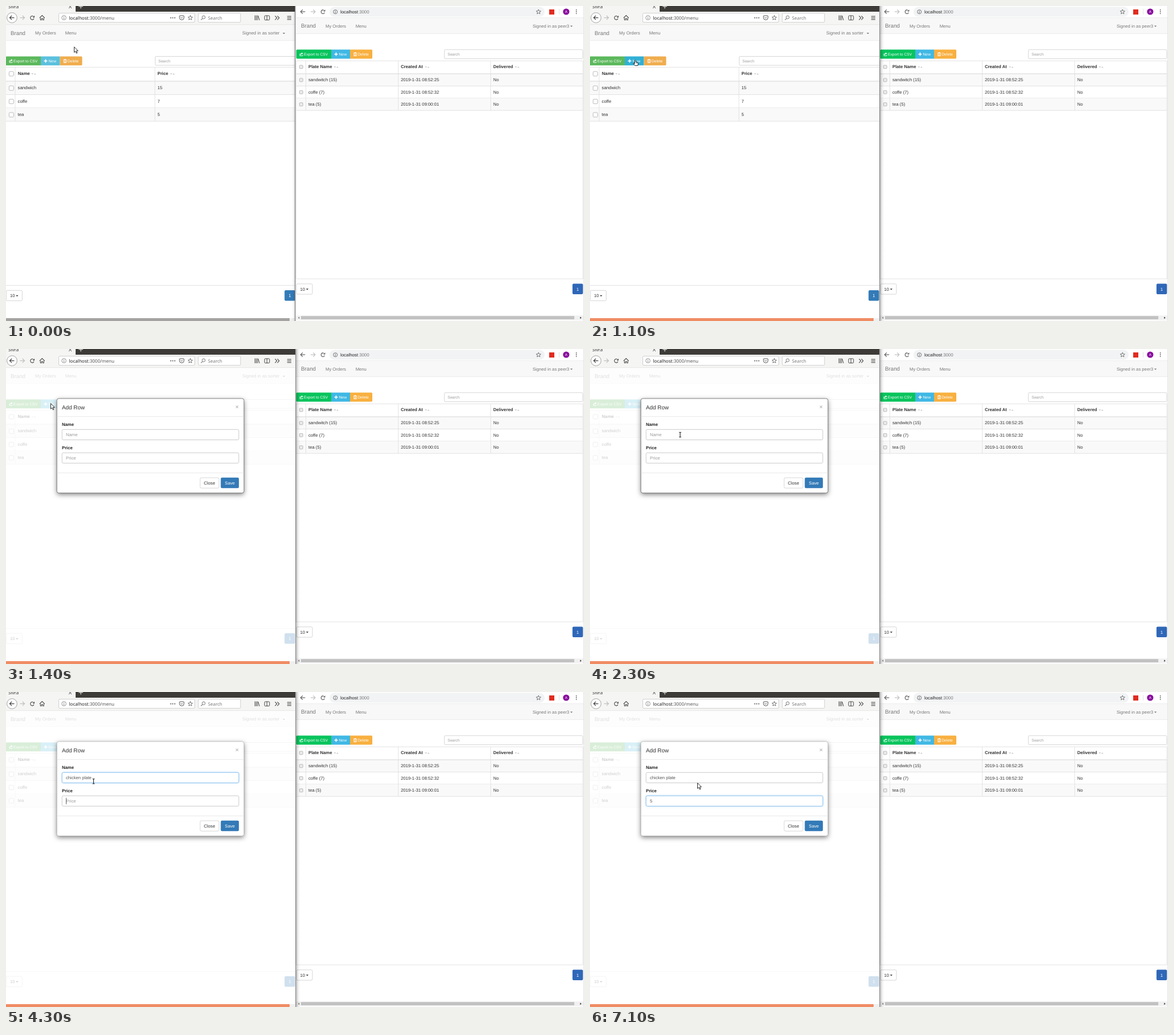
These frames come from a looping animation (1013x553 px, 8000 ms). An HTML page with a canvas:

```html
<!DOCTYPE html>
<html lang="en">
<head>
<meta charset="utf-8">
<title>Two order windows</title>
<style>
html, body { margin: 0; width: 100%; height: 100%; overflow: hidden; background: #fff; }
canvas { display: block; }
</style>
</head>
<body>
<canvas id="stage" width="1013" height="553"></canvas>
<script>
const g = document.getElementById('stage').getContext('2d');
const SANS = '"Liberation Sans", Arial, sans-serif';
const UI = '"Noto Sans", "Open Sans", sans-serif';
const LOOP = 8000;

// --- helpers ---
function rect(x, y, w, h, fill) {
  g.fillStyle = fill;
  g.fillRect(x, y, w, h);
}
function box(x, y, w, h, r, fill, line, lw = 0.8) {
  g.beginPath();
  g.roundRect(x, y, w, h, r);
  if (fill) { g.fillStyle = fill; g.fill(); }
  if (line) { g.strokeStyle = line; g.lineWidth = lw; g.stroke(); }
}
// y is the middle of the capitals; returns the right end
function text(s, x, y, size, color, weight = '', family = SANS) {
  g.font = `${weight} ${size}px ${family}`;
  g.fillStyle = color;
  g.fillText(s, x, y + size * 0.36);
  return x + g.measureText(s).width;
}
function path(points, color, lw = 1, fill, close) {
  g.beginPath();
  points.forEach(([x, y], i) => i ? g.lineTo(x, y) : g.moveTo(x, y));
  if (close) g.closePath();
  if (fill) { g.fillStyle = fill; g.fill(); }
  if (color) { g.strokeStyle = color; g.lineWidth = lw; g.stroke(); }
}
function ring(x, y, r, color, lw = 0.8, fill) {
  g.beginPath();
  g.arc(x, y, r, 0, Math.PI * 2);
  if (fill) { g.fillStyle = fill; g.fill(); }
  if (color) { g.strokeStyle = color; g.lineWidth = lw; g.stroke(); }
}
function at(x, y, draw) {
  g.save();
  g.translate(x, y);
  draw();
  g.restore();
}

// --- toolbar icons ---
function arrowIcon(x, y, dir, color) {
  at(x, y, () => {
    g.scale(dir, 1);
    path([[-3.8, 0], [4, 0]], color, 1.1);
    path([[-0.4, -3.6], [-4, 0], [-0.4, 3.6]], color, 1.1);
  });
}
function reloadIcon(x, y, color) {
  g.beginPath();
  g.arc(x, y, 3.2, 0.4, 5.3);
  g.strokeStyle = color;
  g.lineWidth = 1.1;
  g.stroke();
  path([[x + 4, y - 4], [x + 4, y - 0.6], [x + 0.7, y - 0.6]], null, 0, color, true);
}
function infoIcon(x, y, r, color) {
  ring(x, y, r, color, 0.8);
  rect(x - 0.45, y - 0.6, 0.9, 2.8, color);
  rect(x - 0.45, y - 2.2, 0.9, 0.9, color);
}
function starIcon(x, y, color) {
  const p = [];
  for (let i = 0; i < 10; i++) {
    const a = i * Math.PI / 5 - Math.PI / 2, r = i % 2 ? 1.9 : 4.3;
    p.push([x + r * Math.cos(a), y + r * Math.sin(a)]);
  }
  path(p, color, 0.8, null, true);
}
function homeIcon(x, y) {
  path([[x - 4.5, y + 0.3], [x, y - 4], [x + 4.5, y + 0.3]], '#444', 1.1);
  path([[x - 3, y], [x - 3, y + 4], [x - 1, y + 4], [x - 1, y + 1.2], [x + 1, y + 1.2],
    [x + 1, y + 4], [x + 3, y + 4], [x + 3, y]], '#444', 1);
}

// --- page parts ---
function caret(x, y, color, w = 2.2) {
  path([[x - w, y - w / 2], [x + w, y - w / 2], [x, y + w / 2]], null, 0, color, true);
}
function sorter(x, y) {
  caret(x, y, '#c4c4c4', 2);
  path([[x + 2.4, y + 1], [x + 6.4, y + 1], [x + 4.4, y - 1]], null, 0, '#c4c4c4', true);
}
function actionBar(x, y, widths, colors) {
  let left = x;
  widths.forEach((w, i) => {
    const radii = i === 0 ? [1.6, 0, 0, 1.6] : i === 2 ? [0, 1.6, 1.6, 0] : 0;
    box(left, y, w, 15.8, radii, colors[i]);
    left += w;
  });
  const m = y + 8;
  const ex = x + 6;
  path([[ex + 1.6, m - 0.6], [ex + 0.4, m - 0.6], [ex + 0.4, m + 2.7], [ex + 5.4, m + 2.7], [ex + 5.4, m + 1.2]], '#fff', 0.9);
  path([[ex + 1.7, m + 1.2], [ex + 2.4, m - 0.8], [ex + 3.8, m - 1.4]], '#fff', 1);
  path([[ex + 3.2, m - 3.2], [ex + 6.2, m - 1.4], [ex + 3.2, m + 0.4]], null, 0, '#fff', true);
  text('Export to CSV', ex + 7.4, m, 6.65, '#fff');
  const nx = x + widths[0] + 5.5;
  rect(nx, m - 0.8, 6, 1.6, '#fff');
  rect(nx + 2.2, m - 3, 1.6, 6, '#fff');
  text('New', nx + 8, m, 6.75, '#fff');
  const tx = x + widths[0] + widths[1] + 6;
  rect(tx, m - 2.6, 6, 1, '#fff');
  rect(tx + 2, m - 3.5, 2, 1, '#fff');
  path([[tx + 0.8, m - 1.2], [tx + 0.8, m + 3], [tx + 5.2, m + 3], [tx + 5.2, m - 1.2]], '#fff', 0.9);
  path([[tx + 2.3, m - 1], [tx + 2.3, m + 2.6]], '#fff', 0.6);
  path([[tx + 3.7, m - 1], [tx + 3.7, m + 2.6]], '#fff', 0.6);
  text('Delete', tx + 7.2, m, 6.8, '#fff');
}
function navbar(x, y, size, user, userX, caretX) {
  text('Brand', x, y - 0.4, 9.75, '#777');
  text('My Orders', x + 43, y, size, '#777');
  text('Menu', x + 95.7, y, size, '#777');
  text(user, userX, y, size, '#777');
  caret(caretX, y + 0.6, '#777');
}
function pager(x, y, pageX, blue) {
  box(x, y, 28, 18.2, 2, '#fff', '#ccc');
  text('10', x + 6.5, y + 9.2, 7.7, '#333');
  caret(x + 19, y + 9.5, '#333');
  box(pageX, y - 0.2, 18.4, 18.4, 2, blue);
  text('1', pageX + 7, y + 9.2, 7.7, '#fff');
}
function hline(x1, x2, y, color = '#ddd', h = 0.8) { rect(x1, y - h / 2, x2 - x1, h, color); }
function vline(x, y1, y2, color = '#ddd') { rect(x - 0.4, y1, 0.8, y2 - y1, color); }

function leftPage(hover) {
  rect(0, 33, 507, 520, '#fff');
  rect(0, 33, 507, 27.5, '#f8f8f8');
  hline(0, 507, 60.5, '#e9e9e9');
  navbar(8, 47.5, 7.85, 'Signed in as sorter', 414, 487);
  actionBar(-0.4, 88.5, [61.4, 33.5, 39], ['#5cb85c', hover ? '#31b0d5' : '#5bc0de', '#f0ad4e']);
  box(261.5, 88.5, 250, 15.6, 1.6, '#fff', '#ccc');
  text('Search', 267, 96.7, 6.6, '#999');

  const top = 132, step = 23.4;
  [['sandwich', '15'], ['coffe', '7'], ['tea', '5']].forEach(([name, price], i) => {
    const y = top + i * step;
    if (i % 2 === 0) rect(0, y, 507, step, '#f9f9f9');
    hline(0, 507, y + step);
    box(5.4, y + 8.2, 8, 8, 1.6, '#fff', '#aaa');
    text(name, 20.5, y + 11.5, 7.8, '#333');
    text(price, 265.5, y + 11.5, 7.7, '#333');
  });
  hline(0, 507, 107.6);
  hline(0, 507, top, '#ddd', 1.2);
  vline(16, 107.6, 202);
  vline(261, 107.6, 202);
  box(5.4, 115, 8, 8, 1.6, '#fff', '#aaa');
  text('Name', 20.8, 118.5, 7.7, '#333', 'bold');
  sorter(46.3, 119.3);
  text('Price', 265.5, 118.5, 7.7, '#333', 'bold');
  sorter(289.5, 119.3);
  hline(0, 507, 490.4);
  pager(0.4, 499.3, 488.2, '#337ab7');
}

function leftChrome(active) {
  rect(0, 0, 507, 10, '#3d3b37');
  rect(0, 0, 122, 10, '#f5f5f4');
  rect(0, 10, 507, 23, '#f5f5f4');
  text('Sivra', 4, 1.6, 8, '#333', '', UI);
  path([[110, -1], [115, 4]], '#444', 1);
  path([[115, -1], [110, 4]], '#444', 1);
  rect(127.3, 0.2, 7.6, 1.2, '#ddd');
  rect(130.5, 0, 1.2, 4.5, '#ddd');

  ring(10.5, 20.6, 8.9, '#999', 0.9, '#fdfdfd');
  arrowIcon(10.5, 20.6, 1, '#333');
  arrowIcon(28.5, 20.6, -1, '#bbb');
  reloadIcon(46, 20.8, '#444');
  homeIcon(63.3, 20.6);
  box(92.5, 12.6, 238.3, 16, 1.6, '#fff', '#c4c4c4');
  infoIcon(101.6, 20.6, 3.8, '#777');
  const end = text('localhost', 110.5, 20.7, 8.05, '#222', '', UI);
  text(':3000/menu', end, 20.7, 8.05, '#555', '', UI);
  [288.8, 292.3, 295.8].forEach(x => ring(x, 20.8, 1, null, 0, '#555'));
  box(304, 17, 8, 7.4, [1, 1, 4, 4], null, '#555', 1);
  path([[306, 19.6], [308, 21.6], [310, 19.6]], '#555', 1);
  starIcon(323, 20.8, '#555');
  box(337, 12.6, 74, 16, 1.6, '#fff', '#c4c4c4');
  ring(346.4, 19.8, 2.7, '#777', 1);
  path([[344.4, 21.8], [341.6, 24.6]], '#777', 1.1);
  text('Search', 354, 20.7, 7.9, '#777', '', UI);
  [436.3, 438.6, 440.9].forEach(x => path([[x, 16.5], [x, 25]], '#444', 1));
  path([[441.8, 17], [444.3, 25]], '#444', 1);
  box(453.2, 17, 8.6, 7.6, 1.2, null, '#444', 1);
  path([[457.3, 17], [457.3, 24.6]], '#444', 1);
  [471.5, 475.5].forEach(x => path([[x, 17.3], [x + 3.3, 20.8], [x, 24.3]], '#444', 1.1));
  [17.6, 20.4, 23.2].forEach(y => rect(492.8, y, 7.2, 1.1, '#444'));
  hline(0, 507, 32.8, '#ddd', 0.6);

  rect(0, 548, 507, 5, '#f0efee');
  rect(0, 548, 497, 5, active ? '#f08c64' : '#a5a3a1');
}

function rightWindow() {
  rect(507, 0, 506, 553, '#fff');
  box(567, 1.6, 377, 17.2, 8.6, '#f1f3f4');
  arrowIcon(520.3, 10, 1, '#555');
  arrowIcon(538, 10, -1, '#bbb');
  reloadIcon(555.4, 10.2, '#555');
  infoIcon(577.2, 10.2, 3.5, '#555');
  const end = text('localhost', 586, 10.2, 7.85, '#222');
  text(':3000', end, 10.2, 7.85, '#777');
  starIcon(933.3, 10.3, '#555');
  rect(952, 6, 9, 9, '#e02c20');
  rect(969, 5, 0.8, 10, '#ddd');
  ring(981.8, 10, 5.6, null, 0, '#8a0f9e');
  text('A', 979.8, 10.2, 6, '#fff');
  [6.9, 10, 13.1].forEach(y => ring(999.6, y, 0.9, null, 0, '#555'));

  rect(508, 20.5, 504, 28, '#f8f8f8');
  hline(508, 1012, 20.5, '#e4e4e4', 0.6);
  hline(508, 1012, 48.6, '#e9e9e9');
  navbar(517, 35, 7.68, 'Signed in as peer3', 923, 991);
  actionBar(508.6, 76.6, [61.4, 33, 39], ['#08c45c', '#40b8e4', '#f8b040']);
  box(768.3, 76.7, 242.5, 15.8, 1.6, '#fff', '#ccc');
  text('Search', 774, 84.8, 6.6, '#999');

  const top = 119, step = 21.4;
  [['sandwitch (15)', '08:52:25'], ['coffe (7)', '08:52:32'], ['tea (5)', '09:00:01']].forEach(([name, time], i) => {
    const y = top + i * step;
    if (i % 2 === 0) rect(508.5, y, 502.5, step, '#f9f9f9');
    hline(508.5, 1011, y + step);
    box(514.4, y + 8, 5.8, 5.8, 1, '#ececec', '#aaa');
    text(name, 530, y + 10.6, 7.7, '#333');
    text('2019-1-31 ' + time, 692, y + 10.6, 7.68, '#333');
    text('No', 854, y + 10.6, 7.7, '#333');
  });
  hline(508.5, 1011, 96.2);
  hline(508.5, 1011, top, '#ddd', 1.2);
  [525.5, 687.5, 849.5].forEach(x => vline(x, 96, 183.2));
  [508.6, 1011].forEach(x => vline(x, 96, 479));
  hline(508.5, 1011, 479);
  box(514.4, 104, 5.8, 5.8, 1, '#ececec', '#aaa');
  [['Plate Name', 530, 576.5], ['Created At', 692, 736], ['Delivered', 854, 893.5]].forEach(([s, x, sx]) => {
    text(s, x, 106.2, 7.7, '#333', 'bold');
    sorter(sx, 107.2);
  });
  pager(509, 487.8, 992.8, '#2f67b8');

  rect(508, 543.4, 505, 7.6, '#f1f1f1');
  rect(517, 544.3, 479, 5.8, '#c1c1c1');
  path([[514.2, 545.4], [514.2, 549.2], [511.8, 547.3]], null, 0, '#777', true);
  path([[1006.2, 545.4], [1006.2, 549.2], [1008.6, 547.3]], null, 0, '#333', true);
  rect(508, 551, 505, 2, '#fafafa');
  rect(1012, 0, 1, 553, '#e4e4e4');
}

// the focused window casts its shadow over the other one
function edge(active) {
  const s = active ? g.createLinearGradient(507, 0, 516, 0) : g.createLinearGradient(507, 0, 502, 0);
  s.addColorStop(0, active ? 'rgba(0,0,0,.46)' : 'rgba(0,0,0,.16)');
  s.addColorStop(0.25, active ? 'rgba(0,0,0,.2)' : 'rgba(0,0,0,.1)');
  s.addColorStop(0.6, 'rgba(0,0,0,.05)');
  s.addColorStop(1, 'rgba(0,0,0,0)');
  rect(active ? 507 : 502, 0, active ? 9 : 5, 553, s);
  if (!active) rect(506.2, 0, 1.2, 553, '#777');
}

// --- dialog ---
function field(y, value, hint, focus, bar) {
  g.save();
  if (focus) { g.shadowColor = 'rgba(102,175,233,.4)'; g.shadowBlur = 4; }
  box(98.2, y, 309.8, 18.2, 2.2, '#fff');
  g.restore();
  box(98.2, y, 309.8, 18.2, 2.2, null, focus ? '#7dbaec' : '#c4c4c4', 0.9);
  text(value || hint, 105, y + 9.2, 7.7, value ? '#555' : '#999');
  if (bar) rect(bar, y + 3.5, 0.8, 11.5, '#444');
}
function dialog(t, alpha, dy) {
  g.save();
  g.globalAlpha = alpha;
  g.translate(0, dy);
  g.save();
  g.shadowColor = 'rgba(0,0,0,.5)';
  g.shadowBlur = 9;
  g.shadowOffsetY = 2.8;
  box(89.2, 87, 327.8, 165.8, 3.3, '#fff');
  g.restore();
  box(89.2, 87, 327.8, 165.8, 3.3, null, t < 3300 ? 'rgba(0,0,0,.5)' : 'rgba(0,0,0,.22)', 0.9);
  text('Add Row', 98, 102.7, 9.9, '#333');
  text('×', 402, 101.7, 10, '#bbb', 'bold');
  hline(89.6, 416.6, 118.5, '#e5e5e5');
  text('Name', 98, 132.3, 7.7, '#222', 'bold');
  text('Price', 98, 173.3, 7.7, '#222', 'bold');
  const typed = t >= 3300;
  const priceBar = t >= 6600 ? (t < 7100 && 109.4) : t >= 4300 && t < 5700 && 105.2;
  field(141.3, typed && 'chicken plate', 'Name', typed && t < 4600, typed && t < 4000 && 150.2);
  field(182.2, t >= 6600 && '5', 'Price', t >= 4600, priceBar);
  hline(89.6, 416.6, 217.4, '#e5e5e5');
  box(340.2, 226, 33.2, 18.2, 2.2, '#fff', '#ccc');
  text('Close', 346.8, 235.2, 7.7, '#333');
  box(376.4, 225.8, 31.8, 18.5, 2.2, '#337ab7');
  text('Save', 383.5, 235.2, 7.7, '#fff');
  g.restore();
}

// --- pointer ---
function arrow(x, y) {
  at(x, y, () => path([[0, 0], [0, 9.6], [2.2, 7.7], [3.9, 11.2], [5.4, 10.5], [3.8, 7.1], [6.8, 6.9]],
    '#111', 0.9, '#fff', true));
}
function hand(x, y) {
  at(x, y, () => {
    path([[-1, 0.6], [0, 0], [1, 0.6], [1, 3.6], [4.4, 4.4], [5, 5.4], [4.3, 9.6], [-0.6, 9.6],
      [-3.6, 6], [-2.8, 5.1], [-1, 6.2]], '#111', 0.9, '#fff', true);
    path([[2.2, 4.2], [2.2, 5.6]], '#111', 0.6);
    path([[3.4, 4.4], [3.4, 5.8]], '#111', 0.6);
  });
}
function beam(x, y) {
  path([[x, y - 4.2], [x, y + 4.2]], '#222', 1.1);
  [-4.2, 4.2].forEach(d => path([[x - 1.9, y + d], [x + 1.9, y + d]], '#222', 1));
}
const mix = (a, b, k) => a + (b - a) * k;
const ease = k => k * k * (3 - 2 * k);
function pointer(t) {
  if (t < 600) {
    const k = ease(Math.max(0, (t - 100) / 500));
    const x = mix(119.5, 79.5, k), y = mix(71.8, 95, k);
    return t >= 500 ? hand(x, y) : arrow(x, y);
  }
  if (t < 1200) return hand(79.5, 95);
  if (t < 2000) {
    const k = ease(Math.max(0, (t - 1500) / 600));
    return arrow(mix(78.4, 158, k), mix(95.6, 150, k));
  }
  if (t < 2300) return beam(t < 2100 ? 154 : 158, 150);
  if (t < 3800) return beam(158, 150.5);
  if (t < 4000) return beam(151.8, 150.8);
  if (t < 4600) return beam(153.5, 156.8);
  arrow(t < 5000 ? 182 : 188.5, 159.8);
}

function draw(ms) {
  const t = Math.floor(ms / 100) * 100;
  const active = t >= 1100;
  g.textRendering = 'geometricPrecision';
  g.clearRect(0, 0, 1013, 553);
  leftPage(t >= 500 && t < 1300);
  if (t >= 1200) rect(0, 33, 507, 515, `rgba(255,255,255,${t < 1300 ? 0.4 : 0.77})`);
  leftChrome(active);
  rightWindow();
  edge(active);
  if (t >= 1400) dialog(t, 1, 0);
  else if (t >= 1300) dialog(t, 0.7, -10);
  else if (t >= 1200) dialog(t, 0.12, -36);
  pointer(t);
}

const start = performance.now();
function tick() {
  draw((performance.now() - start) % LOOP);
  requestAnimationFrame(tick);
}
tick();
</script>
</body>
</html>
```
